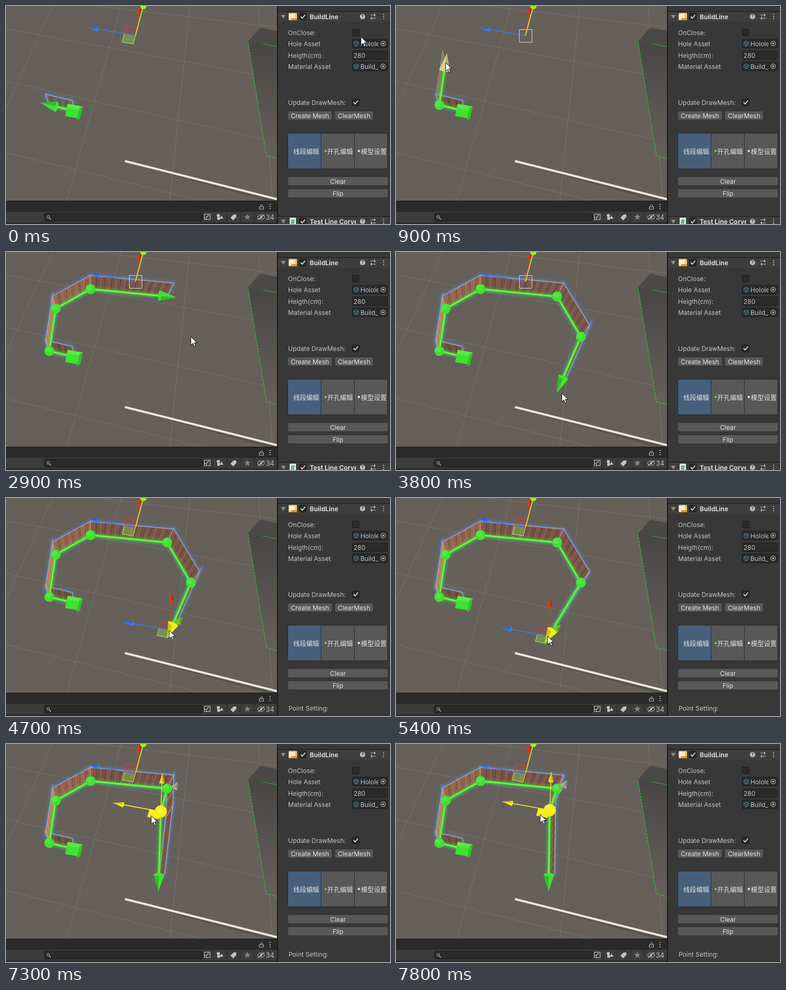
These frames come from a looping animation (727x412 px, 8000 ms). An HTML page with a canvas:

```html
<!DOCTYPE html>
<html lang="en">
<head>
<meta charset="utf-8">
<title>Wall line editor</title>
<style>
html, body { margin: 0; width: 100%; height: 100%; overflow: hidden; background: #383838; }
canvas { display: block; }
</style>
</head>
<body>
<canvas id="stage" width="727" height="412"></canvas>
<script>
const g = document.getElementById('stage').getContext('2d');
const LOOP = 8000, STEP = 100;
const FONT = 'Inter, "Noto Sans CJK SC", "Noto Sans CJK", sans-serif';
const GREEN = '#3ee32f', YELLOW = '#f8ee18', BLUE = '#3b78f0', RED = '#d83a18';
const GROUND = '#66605b', INK = '#c4c4c4', WELL = '#2a2a2a', BAR = '#3e3e3e';
const FINAL = 6, BEND = 5;

// Wall corners in drawing order: cursor arrives, presses (preview), releases (commit)
const nodes = [
  { at: [128, 198], press: 0, release: 0 },
  { at: [82, 187], press: 0, release: 0 },
  { at: [94, 107], arrive: 400, press: 700, release: 1000 },
  { at: [160, 70], arrive: 1300, press: 1600, release: 2100 },
  { at: [305, 84], arrive: 2400, press: 2500, release: 2700 },
  { at: [350, 160], arrive: 2900, press: 3000, release: 3200 },
  { at: [311, 250], arrive: 3400, press: 3400, release: 3600 }
];
const SELECT_END = 4700, DRAG_END = 4900, DROP_END = 5400, SELECT_BEND = 6100, DRAG_BEND = 6300;
const wood = i => ['#6e5044', '#c38463', '#956552', '#79554a'][Math.min(i, 3)];

const clamp = k => Math.min(1, Math.max(0, k));
const progress = (t, from, to) => clamp((t - from) / (to - from));
const mix = (a, b, k) => a + (b - a) * k;
const between = (p, q, kx, ky = kx) => [mix(p[0], q[0], kx), mix(p[1], q[1], ky)];
const add = (p, dx, dy) => [p[0] + dx, p[1] + dy];
const heading = (a, b) => Math.atan2(b[1] - a[1], b[0] - a[0]);
const lift = ([x, y]) => add([x, y], (x - 160) * .084, y * .05 - 29);

function endAt(t) {
  return between(nodes[FINAL].at, [289, 261], progress(t, DRAG_END, DROP_END));
}

function bendAt(t) {
  const k = progress(t, DRAG_BEND, DRAG_BEND + 1200);
  return between(nodes[BEND].at, [291, 125], Math.sin(k * Math.PI / 2), k * k * (3 - 2 * k));
}

function cursorAt(t) {
  if (t >= DRAG_BEND) return add(bendAt(t), -18, 8);
  if (t >= DRAG_END && t < DROP_END) return add(endAt(t), -2, 0);
  const stops = [
    { at: [672, 58], release: 100 },
    ...nodes.slice(2),
    { at: [314, 267], arrive: 3800, release: 4200 },
    { at: add(nodes[FINAL].at, -2, 0), arrive: SELECT_END, release: DRAG_END },
    { at: add(endAt(DROP_END), -2, 0), arrive: DROP_END, release: 5800 },
    { at: nodes[BEND].at, arrive: SELECT_BEND, release: SELECT_BEND },
    { at: add(nodes[BEND].at, -18, 8), arrive: DRAG_BEND }
  ];
  const i = stops.findIndex(stop => t < stop.arrive);
  return between(stops[i - 1].at, stops[i].at, progress(t, stops[i - 1].release, stops[i].arrive));
}

function paint(fill, stroke, width = 1) {
  if (fill) { g.fillStyle = fill; g.fill(); }
  if (stroke) { g.strokeStyle = stroke; g.lineWidth = width; g.stroke(); }
}

function trace(points, closed) {
  g.beginPath();
  points.forEach(p => g.lineTo(...p));
  if (closed) g.closePath();
}

function box(x, y, w, h, fill, stroke, radius = 0) {
  g.beginPath();
  g.roundRect(x, y, w, h, radius);
  paint(fill, stroke);
}

function poly(points, fill, stroke, width) { trace(points, true); paint(fill, stroke, width); }
function line(points, color, width = 1) { trace(points); paint(null, color, width); }
function disc(x, y, r, fill, stroke, width) { g.beginPath(); g.arc(x, y, r, 0, 7); paint(fill, stroke, width); }
function oval(x, y, rx, ry, fill, stroke) { g.beginPath(); g.ellipse(x, y, rx, ry, 0, 0, 7); paint(fill, stroke); }

// Parallelogram spanned by two edge vectors
function quad(p, u, v, fill, stroke) {
  const q = add(p, ...u);
  poly([p, q, add(q, ...v), add(p, ...v)], fill, stroke);
}

// Evenly spaced points on a circle; radii alternate through the list
function ring(x, y, count, ...radii) {
  return Array.from({ length: count }, (_, i) => {
    const a = i * 2 * Math.PI / count - Math.PI / 2, r = radii[i % radii.length];
    return [x + r * Math.cos(a), y + r * Math.sin(a)];
  });
}

function text(str, x, y, color = INK, style = '12px', align = 'left') {
  g.font = `${style} ${FONT}`;
  g.textAlign = align;
  g.fillStyle = color;
  g.fillText(str, x, y);
}

function clipped(x, y, w, h, draw) {
  g.save();
  g.beginPath();
  g.rect(x, y, w, h);
  g.clip();
  draw();
  g.restore();
}

function glowing(color, blur, draw) {
  g.save();
  g.shadowColor = color;
  g.shadowBlur = blur;
  draw();
  g.restore();
}

function sphere([x, y], r, color) {
  disc(x, y, r, color);
  disc(x - r * .2, y - r * .25, r * .55, 'rgba(255,255,255,.12)');
}

function cone(p, angle, back, front, half, color) {
  g.save();
  g.translate(...p);
  g.rotate(angle);
  poly([[-back, -half], [front, 0], [-back, half]], color);
  poly([[-back, 0], [front, 0], [-back, half]], 'rgba(0,0,0,.18)');
  oval(-back, 0, half * .3, half, color);
  g.restore();
}

function axis(from, to, color) {
  line([from, to], color, 1.6);
  cone(to, heading(from, to), 18, 0, 5, color);
}

function drawGround() {
  g.fillStyle = GROUND;
  g.fillRect(0, 0, 513, 368);
  for (let i = 0; i < 4; i++) {
    const grid = 'rgba(200,200,200,.17)';
    line([[88 + 130 * i, 0], [195 * i - 80, 368]], grid);
    line([[0, 18 * i * i + 45 * i - 20], [513, 12 * i * i + 85 * i + 40]], grid);
  }

  const shade = g.createLinearGradient(0, 60, 0, 285);
  shade.addColorStop(0, '#474543');
  shade.addColorStop(1, GROUND);
  const left = [458, 67], foot = [493, 283], inner = [487, 72];
  poly([left, [513, 77], [513, 288], foot], shade);
  poly([left, [481, 41], [513, 47], [513, 77]], '#4b4947');
  g.setLineDash([4, 2]);
  line([[513, 288], foot, left], '#22dd22');
  line([inner, [513, 77]], '#22dd22');
  g.setLineDash([]);

  poly([[225, 295], [513, 367], [513, 374]], 'rgba(50,60,50,.3)');
  line([[225, 293], [513, 365]], '#eee6d8', 4);
}

function drawWall(a, b, color) {
  const face = k => [between(a, b, k), between(lift(a), lift(b), k)];
  const [[a0, a1], [b0, b1]] = [face(0), face(1)];
  poly([a0, b0, b1, a1], color);
  const grains = Math.ceil(Math.hypot(b[0] - a[0], b[1] - a[1]) / 2);
  for (let i = 0; i < grains; i++) {
    const tone = Math.sin(i * .9) + Math.sin(i * 2.3);
    const [p, q] = face(i / grains), [r, s] = face((i + 1) / grains);
    poly([p, q, s, r], tone > 0 ? `rgba(255,200,160,${tone * .07})` : `rgba(30,10,0,${-tone * .1})`);
  }
  poly([a0, b0, b1, a1], null, 'rgba(235,170,120,.75)');
}

function drawWalls(mesh, drawn) {
  const spans = mesh.slice(1).map((b, i) => [mesh[i], b]);
  glowing('#4a9cff', 6, () => spans.forEach(([a, b]) =>
    poly([a, b, lift(b), lift(a)], null, 'rgba(90,155,235,.75)', 3.5)));
  spans.forEach(([a, b], i) => drawWall(a, b, drawn ? wood(i) : GROUND));
}

function drawCube(p) {
  const across = [28, 5], down = [-5, 23];
  const corner = add(p, -11, -13);
  quad(corner, across, down, GREEN);
  quad(corner, across, [-2, 7], '#55ee45');
  quad(add(corner, ...across), [-6, 3], down, '#2fc522');
}

function drawHandles(o, active, reach = 13) {
  const side = [-21, -4];
  if (!active) quad(o, side, [3, -reach], 'rgba(200,60,40,.25)', '#b9503f');
  quad(o, side, [-4, reach + 1], active ? YELLOW : 'rgba(140,205,75,.45)', active ? YELLOW : '#b8e47c');
  axis(o, add(o, -89, -16), active ? YELLOW : BLUE);
}

function drawOriginGizmo(snapping) {
  const o = [245, 56], top = [260, 0];
  if (snapping) {
    axis(o, add(o, -86, -15), BLUE);
    box(233.5, 44.5, 24, 24, null, '#d8d8d8');
  } else drawHandles(o, false, 15);
  line([o, [254, 8]], RED, 1.6);
  cone([253, 8], heading(o, top), 6, 10, 5, RED);
  line([o, top], '#c3e83c', 1.8);
  disc(...top, 6, '#9af02c');
}

function drawPointGizmo(p, active) {
  const depth = 260 - p[1];
  const away = add(p, 19 + depth * .08, -18 - depth * .25);
  const awayColor = active ? '#a8a8a5' : '#72c62b';
  line([p, away], awayColor);
  cone(away, heading(p, away), 8, 6, 7, awayColor);
  drawHandles(p, active);
  axis(p, add(p, 3, -72), active ? '#ecdc22' : RED);
}

function drawScene(t) {
  drawGround();
  const count = nodes.filter(node => t >= node.press).length, last = count - 1;
  const previewing = t < nodes[last].release;
  // The wall follows a dragged corner with a short delay
  const shape = bend => [...nodes.slice(0, BEND).map(node => node.at), bend, endAt(t)].slice(0, count);
  const points = shape(bendAt(t)), mesh = shape(bendAt(t - 300));
  const selected = t < SELECT_END ? -1 : t < SELECT_BEND ? FINAL : BEND;
  const dragging = t >= DRAG_BEND || (t >= DRAG_END && t < DROP_END);

  drawWalls(previewing ? mesh.slice(0, -1) : mesh, t >= nodes[2].press);
  const [a, b] = points.slice(-2);
  if (previewing) poly([a, b, lift(b), lift(a)], 'rgba(190,165,145,.35)', '#b39272');

  glowing(GREEN, 6, () => line(points, 'rgba(62,225,50,.75)', 5));
  line(points, '#a9f558', 1.3);
  drawCube(points[0]);
  points.slice(1, -1).forEach(p => sphere(p, 9.5, GREEN));
  cone(b, heading(a, b), 14, 18, 10, previewing ? '#d9d28a' : GREEN);

  drawOriginGizmo(t >= 300 && t < 4300);
  if (selected < 0) return;
  drawPointGizmo(points[selected], dragging);
  if (selected === FINAL) cone(b, heading(a, b), 13, 14, 10, YELLOW);
  else sphere(points[BEND], 11.5, YELLOW);
}

function kebab(x, y) { [-4, 0, 4].forEach(d => disc(x, y + d, 1.1, INK)); }

function drawBottomBar() {
  box(0, 368, 515, 44, WELL);
  box(0, 368, 514, 1, '#191919');
  box(0, 389, 514, 20, '#3c3c3c');
  box(72.5, 391.5, 300, 15, WELL, '#1c1c1c', 3);
  disc(80, 398.5, 2.4, null, INK);
  line([[82, 400.5], [85, 403.5]], INK, 1.3);
  for (let i = 0; i < 4; i++) box(392 + 26 * i, 389, 1, 20, WELL);

  box(479.5, 379.5, 8, 4.5, null, INK);
  g.beginPath();
  g.arc(484, 378.5, 2.6, Math.PI, 0);
  paint(null, INK);
  kebab(500, 379);

  const y = 399;
  box(375.5, y - 5.5, 11, 10, null, INK);
  box(375.5, y + .5, 4, 4, null, INK);
  line([[380, y], [384, y - 4]], INK, 1.3);
  disc(402, y - 3, 3, INK);
  box(400, y, 5, 5, INK);
  poly(ring(408, y + 1, 3, 4), INK);
  quad([425, y + 1], [6, -6], [5, 5], INK);
  box(431, y - 5, 5, 5, INK);
  poly(ring(457, y, 10, 6.5, 2.7), '#858585');
  oval(483, y, 6.5, 4, null, INK);
  disc(483, y, 2, INK);
  line([[477, y + 5], [489, y - 5]], INK, 1.5);
  text('34', 492, y + 4.5, INK, '12.5px');
}

function checkbox(x, y, checked) {
  box(x - 6.5, y - 6.5, 13, 13, WELL, '#1a1a1a', 2);
  if (checked) line([[x - 4, y], [x - 1, y + 3], [x + 4.5, y - 3.5]], '#d8d8d8', 1.8);
}

function header(title, y, drawIcon) {
  box(515, y - 10, 212, 20, BAR);
  box(515, y - 10, 212, 1, '#1a1a1a');
  poly([[520.5, y - 3], [529.5, y - 3], [525, y + 4]], '#8f8f8f');
  drawIcon(y);
  checkbox(562, y, true);
  clipped(575, y - 9, 88, 20, () => text(title, 575, y + 4.5, '#d6d6d6', 'bold 12px'));
  disc(675, y, 5, INK);
  text('?', 675, y + 3.2, BAR, 'bold 9px', 'center');
  for (const d of [-3, 3]) {
    box(690, y + d - .5, 10, 1, INK);
    box(694 - d, y + d - 2.5, 1.5, 5, INK);
  }
  kebab(715, y);
}

function meshIcon(y) {
  box(535, y - 7, 16, 14, '#f3c05c', null, 2);
  box(536, y - 5, 11, 10, '#f7ecd6');
  box(540, y + 3, 11, 4, '#e98a2e');
}

function scriptIcon(y) {
  box(537, y - 7, 12, 14, '#e6e6e6', null, 1);
  text('#', 543, y + 4.5, '#2d9b49', 'bold 12px', 'center');
}

function field(value, y, isAsset) {
  box(655.5, y - 8.5, 67, 17, WELL, '#202020', 2);
  if (!isAsset) return text(value, 658, y + 4.5);
  poly(ring(663, y, 6, 4.7), null, '#5b93b5');
  ring(663, y, 3, -4.7).forEach(p => line([[663, y], p], '#5b93b5'));
  clipped(670, y - 8, 35, 16, () => text(value, 671, y + 4.5));
  disc(714, y, 4.3, null, INK, 1.1);
  disc(714, y, 1.7, INK);
}

function button(label, x, y, w) {
  box(x - .5, y - .5, w, 17, '#585858', '#303030', 3);
  text(label, x + w / 2 - .5, y + 12.5, '#e4e4e4', '12px', 'center');
}

function tab(label, i) {
  const x = 534 + 63 * i, active = i === 0, size = active ? 1 : 4;
  box(x - .5, 240.5, 63, 67, active ? '#46607c' : '#585858', WELL);
  box(x + 6, 274 - size / 2, size, size, ['#7fa6cc', '#79b07a', '#dfd6b4'][i]);
  text(label, x + 10 + i, 279.5, '#e4e4e4', '12.2px');
}

function drawPanel(pointSelected) {
  box(513, 0, 214, 412, '#383838');
  box(513, 0, 2, 412, '#1c1c1c');
  header('BuildLine', 20, meshIcon);
  const rowY = i => Math.round(50 + 21.3 * i);
  ['OnClose:', 'Hole Asset', 'Heigth(cm):', 'Material Asset'].forEach((label, i) => text(label, 534, rowY(i) + 5));
  checkbox(662, rowY(0), false);
  field('Holole', rowY(1), true);
  field('280', rowY(2), false);
  field('Build_', rowY(3), true);
  text('Update DrawMesh:', 534, 187);
  checkbox(662, 182, true);
  button('Create Mesh', 534, 199, 84);
  button('ClearMesh', 623, 199, 73);
  ['线段编辑', '开孔编辑', '模型设置'].forEach(tab);
  ['Clear', 'Flip'].forEach((label, i) => button(label, 534, 323 + 23 * i, 190));
  if (pointSelected) text('Point Setting:', 535, 401.5);
  else header('Test Line Corve', 407, scriptIcon);
}

function drawCursor([x, y]) {
  g.save();
  g.translate(x, y);
  poly([[0, 0], [0, 16], [4, 12.5], [6.5, 18.5], [9, 17.3], [6.4, 11.5], [11.5, 11.5]], '#fff', '#111');
  g.restore();
}

function render(now) {
  const t = Math.floor(now % LOOP / STEP) * STEP;
  clipped(0, 0, 513, 368, () => drawScene(t));
  drawBottomBar();
  drawPanel(t >= SELECT_END);
  drawCursor(cursorAt(t));
}

const start = performance.now();
function tick() {
  render(performance.now() - start);
  requestAnimationFrame(tick);
}
tick();
</script>
</body>
</html>
```
